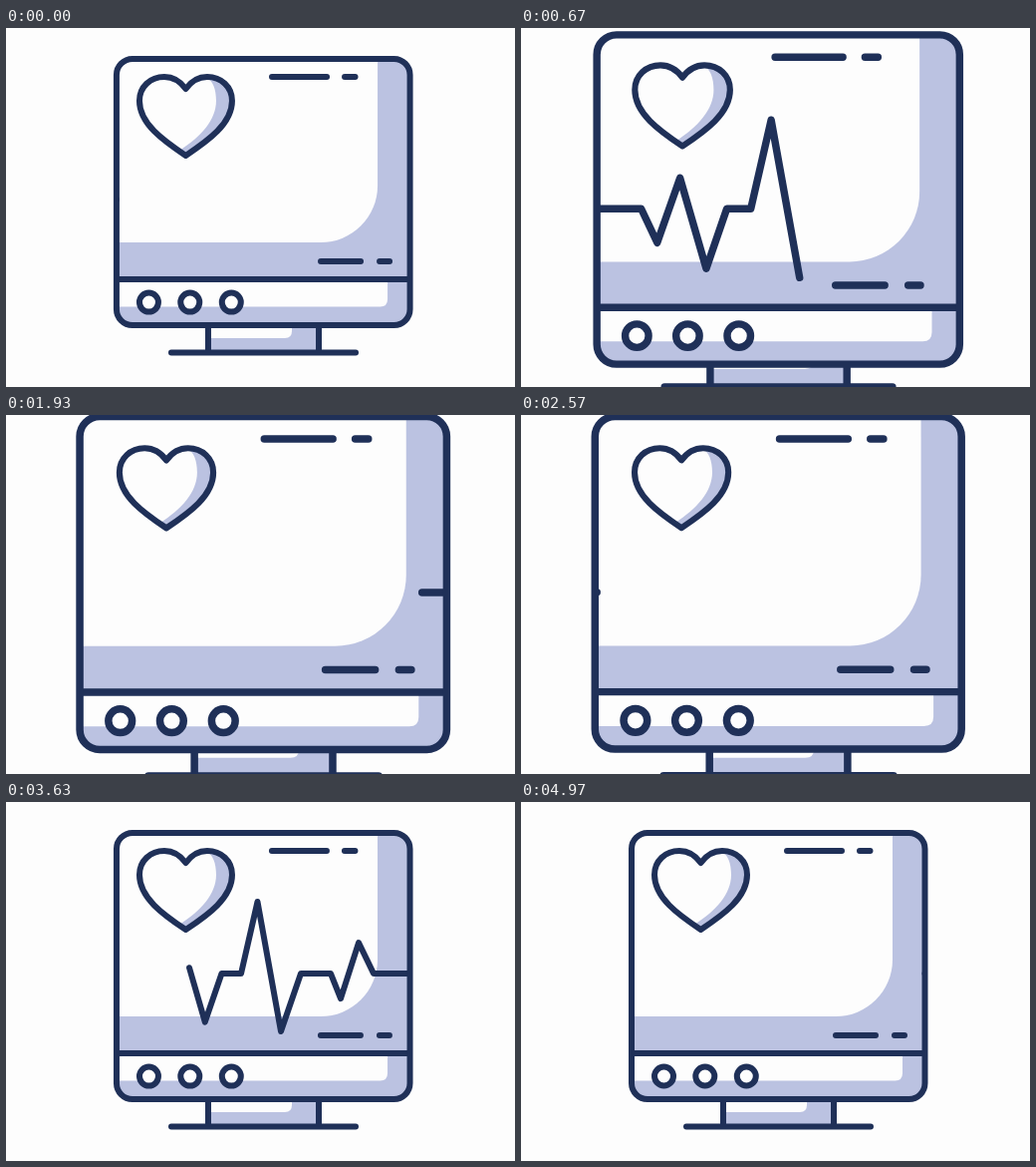
An HTML page without scripts that plays this animation: 511x360 px, repeating every 5010 ms.

```html
<!DOCTYPE html>
<html lang="en">
<head>
<meta charset="utf-8">
<title>Heart monitor</title>
<style>
  @property --zoom { syntax: "<number>"; inherits: true; initial-value: 0; }
  @property --bob { syntax: "<number>"; inherits: true; initial-value: 0; }
  @property --tail { syntax: "<number>"; inherits: true; initial-value: 0; }
  @property --head { syntax: "<number>"; inherits: true; initial-value: 0; }

  :root {
    --ink: #1f3058;
    --shade: #bbc2e1;
    --paper: #fdfdfd;
    --sine: cubic-bezier(.37, 0, .63, 1);
  }
  html, body {
    margin: 0;
    width: 100%;
    height: 100%;
    overflow: hidden;
    background: var(--paper);
  }
  svg {
    display: block;
    width: 100%;
    height: 100%;
    animation: zoom 5.01s infinite, bob 5.01s var(--sine) infinite;
  }
  .line {
    fill: none;
    stroke: var(--ink);
    stroke-width: 6;
    stroke-linecap: round;
    stroke-linejoin: round;
  }
  .shade { fill: var(--shade); }
  .paper { fill: var(--paper); }
  .knobs { fill: var(--paper); }

  .device {
    transform-origin: 258.3px 180px;
    transform: scale(calc((1 + .225 * var(--zoom)) * (1 + .04 * var(--bob))));
  }
  .monitor { transform: translateY(calc(12px * var(--bob))); }
  .dashes { transform: translateX(calc(-15px * var(--bob))); }
  .heart {
    transform-origin: 180.5px 88px;
    transform: scale(calc(1 - .19 * var(--zoom)));
  }
  .pulse {
    stroke-dasharray: calc(1px * (var(--head) - var(--tail))) 300px;
    stroke-dashoffset: calc(-1px * var(--tail));
    animation: head 2.505s var(--sine) infinite, tail 2.505s var(--sine) infinite;
  }

  @keyframes zoom {
    0% { --zoom: 0; animation-timing-function: cubic-bezier(.33, .67, .67, 1); }
    20% { --zoom: 1; }
    50.9% { --zoom: 1; animation-timing-function: cubic-bezier(.37, 0, .63, 1); }
    61.8%, 100% { --zoom: 0; }
  }
  @keyframes bob {
    0%, 22.2%, 43.5%, 71.9%, 96.4%, 100% { --bob: 0; }
    9%, 33.9%, 58.9%, 84.6% { --bob: 1; }
  }
  @keyframes head {
    0%, 1.4% { --head: 0; }
    43.8%, 100% { --head: 100; }
  }
  @keyframes tail {
    0%, 29.2% { --tail: 0; }
    82.8%, 100% { --tail: 100; }
  }
</style>
</head>
<body>
<svg viewBox="0 0 511 360" preserveAspectRatio="none">
  <defs>
    <path id="heart" d="M180.500 61C174 52 166 49 159 49C145 49 134 59 134 73C134 96 158 113 180.500 128C203 113 227 96 227 73C227 59 216 49 202 49C195 49 187 52 180.500 61Z"/>
    <clipPath id="screen"><rect x="111" y="31" width="294.5" height="221"/></clipPath>
  </defs>

  <g class="device">
    <g class="stand">
      <path class="shade" d="M203 298H314V325H203Z"/>
      <path class="paper" d="M203 298H287V304Q287 311 280 311H203Z"/>
      <path class="line" d="M203 298V325M314 298V325M166 325.5H351"/>
    </g>

    <g class="monitor">
      <rect class="shade" x="111" y="31" width="294.5" height="267" rx="16"/>
      <path class="paper" d="M111 47a16 16 0 0 1 16-16H373V158a57 57 0 0 1-57 57H111Z"/>
      <path class="paper" d="M111 252H383V272Q383 279.500 375.500 279.500H111Z"/>

      <g clip-path="url(#screen)">
        <path class="line pulse" pathLength="100" d="M111 172H147L160 199.500 178.500 147 199.800 220.500 216.500 172H236L252.500 100 276 230 296 172H326L336 197 354 141 369 172H405.500"/>
      </g>

      <path class="line dashes" d="M267 49H322M340 49H350.500M316 234H356M375 234H385"/>

      <g class="heart">
        <use class="paper" href="#heart"/>
        <path class="shade" d="M200 49C208 52 211 62 211 73C211 92 196 109 174 123L180.500 128C203 113 227 96 227 73C227 59 216 49 200 49Z"/>
        <use class="line" href="#heart"/>
      </g>

      <path class="line" d="M114 252H402.500"/>
      <rect class="line" x="111" y="31" width="294.5" height="267" rx="16"/>
      <g class="line knobs">
        <circle cx="143.500" cy="275" r="9.500"/>
        <circle cx="184.800" cy="275" r="9.500"/>
        <circle cx="226.300" cy="275" r="9.500"/>
      </g>
    </g>
  </g>
</svg>
</body>
</html>
```
